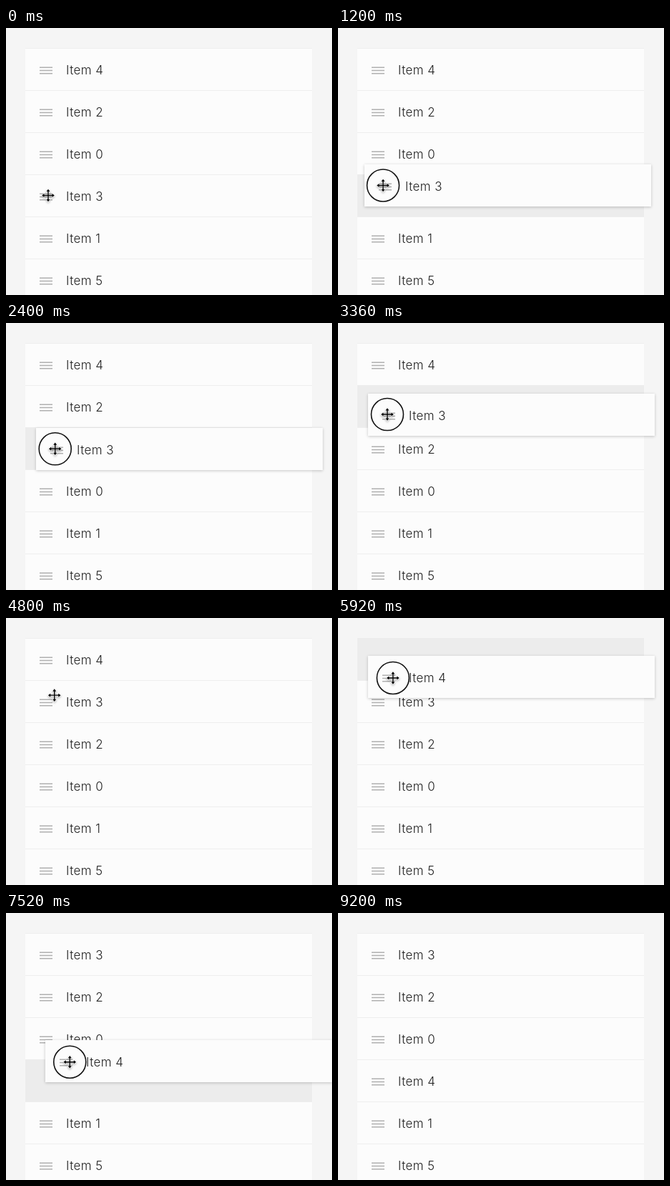
Recreate the animation shown at these times as an HTML page with a canvas. Size 456 by 374 pixels, loop 9840 ms.

```html
<!DOCTYPE html>
<html lang="en">
<head>
<meta charset="utf-8">
<title>Sortable list</title>
<style>
  html, body { margin: 0; width: 100%; height: 100%; overflow: hidden; background: #f5f5f5; }
  canvas { display: block; }
</style>
</head>
<body>
<canvas id="stage" width="456" height="374"></canvas>
<script>
const ctx = document.getElementById('stage').getContext('2d');
const LOOP = 9840, STEP = 80, POINTER_GONE = 9200;
const LEFT = 27, TOP = 28, WIDTH = 401, ROW = 59;

const drags = [
  { start: 400, end: 3680, from: 3, to: 1 },
  { start: 5280, end: 8160, from: 0, to: 3 }
];

const glide = (t, start, end) => Math.min(1, Math.max(0, (t - start) / (end - start)));
const settle = (k, rate) => 1 - Math.exp(-rate * k);

// Each drag drifts right quickly at first, then runs almost straight up or down.
function pointerAt(t) {
  const approach = glide(t, 80, 240);
  const rise = .12 * glide(t, 400, 1200) + .88 * glide(t, 1520, 3560);
  const toTop = glide(t, 4720, 5200);
  const fall = glide(t, 5600, 7600);
  const leave = glide(t, 9040, 9120);
  return {
    x: 59 - 5.5 * approach + 15.5 * settle(rise, 8) - 7.5 * toTop + 28 * settle(fall, 5) + 36 * leave,
    y: 234.5 - 116.5 * rise - 59 * toTop + 156 * fall + 122 * leave
  };
}

function move(list, from, to) {
  list.splice(to, 0, list.splice(from, 1)[0]);
}

function drawContent(item, x, y) {
  ctx.fillStyle = '#b0b0b0';
  for (let i = 0; i < 3; i++) ctx.fillRect(x + 20, y + 26.5 + i * 4.25, 18, 1.5);
  ctx.fillStyle = '#222';
  ctx.font = '300 17px Montserrat, Inter, sans-serif';
  ctx.letterSpacing = '.4px';
  ctx.fillText('Item ' + item, x + 57, y + 36.5);
}

function drawRow(item, y) {
  ctx.fillStyle = '#fcfcfc';
  ctx.fillRect(LEFT, y, WIDTH, ROW);
  ctx.fillStyle = '#eee';
  ctx.fillRect(LEFT, y, WIDTH, 1);
  drawContent(item, LEFT, y);
}

function drawLifted(item, x, y) {
  ctx.save();
  ctx.shadowColor = 'rgba(0,0,0,.22)';
  ctx.shadowBlur = 4;
  ctx.shadowOffsetY = 1;
  ctx.fillStyle = '#fcfcfc';
  ctx.fillRect(x, y, WIDTH, ROW);
  ctx.restore();
  drawContent(item, x, y);
}

function drawPointer(x, y, pressed) {
  ctx.save();
  ctx.translate(x, y);
  if (pressed) {
    ctx.strokeStyle = '#111';
    ctx.lineWidth = 1.6;
    ctx.beginPath();
    ctx.arc(0, 0, 22.5, 0, 7);
    ctx.stroke();
  }
  const arm = new Path2D('M-.7 0V-5.5H-2.5L0-8.8 2.5-5.5H.7V0Z');
  const arrows = new Path2D();
  for (let i = 0; i < 4; i++) arrows.addPath(arm, new DOMMatrix().rotate(i * 90));
  ctx.lineJoin = 'round';
  ctx.lineWidth = 1.5;
  ctx.strokeStyle = 'rgba(255,255,255,.7)';
  ctx.shadowColor = 'rgba(0,0,0,.4)';
  ctx.shadowBlur = 3;
  ctx.shadowOffsetY = 1.5;
  ctx.stroke(arrows);
  ctx.shadowColor = 'transparent';
  ctx.fillStyle = '#000';
  ctx.fill(arrows);
  ctx.restore();
}

function draw(t) {
  ctx.fillStyle = '#f5f5f5';
  ctx.fillRect(0, 0, 456, 374);

  const pointer = pointerAt(t);
  const list = [4, 2, 0, 3, 1, 5];
  let held = null;
  for (const d of drags) {
    if (t >= d.end) move(list, d.from, d.to);
    else if (t >= d.start) {
      const grab = pointerAt(d.start);
      const dx = Math.round(pointer.x - grab.x), dy = Math.round(pointer.y - grab.y);
      const slot = d.from + Math.round(dy / ROW);
      held = { item: list[d.from], slot, x: LEFT + dx, y: TOP + d.from * ROW + dy };
      move(list, d.from, slot);
    }
  }

  list.forEach((item, i) => {
    if (!held || i !== held.slot) drawRow(item, TOP + i * ROW);
  });
  if (held) {
    ctx.fillStyle = '#ececec';
    ctx.fillRect(LEFT, TOP + held.slot * ROW, WIDTH, ROW);
    drawLifted(held.item, held.x, held.y);
  }
  if (t < POINTER_GONE) drawPointer(pointer.x, pointer.y, held);
}

function frame() {
  const t = performance.now() % LOOP;
  draw(Math.floor(t / STEP) * STEP);
  requestAnimationFrame(frame);
}
frame();
</script>
</body>
</html>
```
